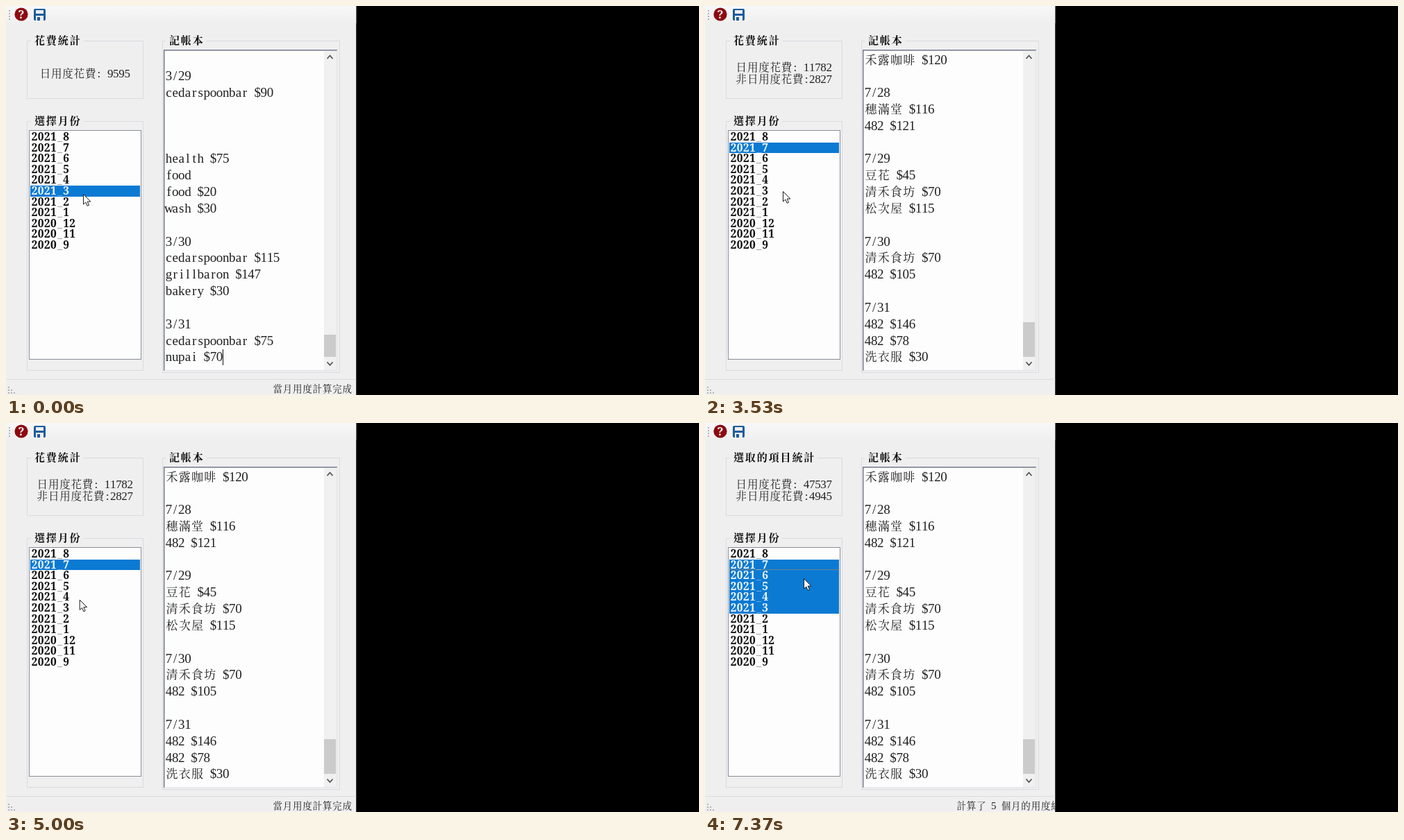
These frames come from a looping animation (998x561 px, 7410 ms). An HTML page with a canvas:

```html
<!DOCTYPE html>
<html lang="zh-Hant">
<head>
<meta charset="utf-8">
<title>記帳本</title>
<style>
html, body { margin: 0; width: 100%; height: 100%; overflow: hidden; background: #000; }
canvas { display: block; width: 998px; height: 561px; }
</style>
</head>
<body>
<canvas id="stage" width="998" height="561"></canvas>
<script>
const ctx = document.getElementById('stage').getContext('2d');
const LOOP = 7410, APP_W = 504.5;
const FACE = '#efefef', PAPER = '#fdfdfd', INK = '#202020', BLUE = '#0b7ad3', GROUP = '#dadae2';
const LATIN = '"Liberation Serif", "Noto Serif", serif';
const SLAB = '"Noto Serif", "Liberation Serif", serif';
const HAN = '"Noto Serif CJK TC", "Noto Sans CJK TC", "Noto Sans CJK", sans-serif';

const MONTHS = '2021_8 2021_7 2021_6 2021_5 2021_4 2021_3 2021_2 2021_1 2020_12 2020_11 2020_9'.split(' ');
const march = {
  row: 5,
  thumb: 474,
  sum: ['日用度花費: 9595'],
  lines: ['', '3/29', 'cedarspoonbar $90', '', '', '', 'health $75', 'food', 'food $20',
    'wash $30', '', '3/30', 'cedarspoonbar $115', 'grillbaron $147', 'bakery $30', '',
    '3/31', 'cedarspoonbar $75', 'nupai $70']
};
const july = {
  row: 1,
  thumb: 456,
  sum: ['日用度花費: 11782', '非日用度花費:2827'],
  lines: ['禾露咖啡 $120', '', '7/28', '穗滿堂 $116', '482 $121', '', '7/29', '豆花 $45',
    '清禾食坊 $70', '松次屋 $115', '', '7/30', '清禾食坊 $70', '482 $105', '', '7/31',
    '482 $146', '482 $78', '洗衣服 $30']
};
const RANGE_SUM = ['日用度花費: 47537', '非日用度花費:4945'];
const DONE = '當月用度計算完成', RANGE_DONE = '計算了 5 個月的用度總';

// The story: clicks on a month, then a drag over several months.
const CLICKS = [[-200, march], [1690, july], [3650, march], [4300, july]];
const DRAG = 5070, DROP = 5940;
const LAG = 60, BLINK = 530, STATUS_TIME = 1580;

// Pointer moves: begin, end, x, y
const HOME = [111, 271];
const MOVES = [
  [500, 630, 101, 256], [770, 1400, 105, 208], [1720, 2270, 106, 251], [2300, 2530, 112, 267],
  [4030, 4290, 104, 201], [4830, 5060, 106, 265], [5080, 5400, 97, 191], [5600, 5900, 104, 206],
  [6370, 7100, 150, 234], [7130, 7370, 142, 224]
];

const clamp = (v, lo, hi) => Math.max(lo, Math.min(hi, v));
const ease = u => u * u * (3 - 2 * u);
const lastClick = t => CLICKS.filter(([time]) => time <= t).pop() || CLICKS[0];

function pointerAt(t) {
  return MOVES.reduce(([px, py], [begin, end, x, y]) => {
    const k = ease(clamp((t - begin) / (end - begin), 0, 1));
    return [px + (x - px) * k, py + (y - py) * k];
  }, HOME);
}

const ROW_H = 15.57;
const rowY = r => Math.round(181.1 + r * ROW_H);
const rowAt = y => Math.floor((y - 181.1) / ROW_H);

function stateAt(t) {
  const [time, month] = lastClick(t);
  const [sumTime, summed] = lastClick(t - LAG);
  const dragging = t >= DRAG, ranged = t >= DROP + LAG;
  const bottom = dragging ? march.row : month.row;
  return {
    month, bottom, dragging,
    top: dragging ? clamp(rowAt(pointerAt(Math.min(t, DROP))[1]), 0, bottom) : bottom,
    caret: t < DRAG && (t - time) % (2 * BLINK) < BLINK,
    title: ranged ? '選取的項目統計' : '花費統計',
    sum: ranged ? RANGE_SUM : summed.sum,
    status: ranged ? RANGE_DONE : t < sumTime + STATUS_TIME ? DONE : ''
  };
}

function fill(color, x, y, w, h) {
  ctx.fillStyle = color;
  ctx.fillRect(x, y, w, h);
}

function frame(color, x, y, w, h) {
  ctx.strokeStyle = color;
  ctx.lineWidth = 1;
  ctx.strokeRect(x + .5, y + .5, w - 1, h - 1);
}

function line(color, width, ...pts) {
  ctx.strokeStyle = color;
  ctx.lineWidth = width;
  ctx.beginPath();
  pts.forEach(([x, y]) => ctx.lineTo(x, y));
  ctx.stroke();
}

// Fixed pitch text: Han characters take two cells. Returns the end x.
function type(str, x, y, cell, latin, han, color = INK) {
  ctx.fillStyle = color;
  ctx.textAlign = 'center';
  for (const ch of str) {
    const wide = ch > '\u2e80', w = wide ? cell * 2 : cell;
    ctx.font = wide ? han : latin;
    ctx.globalAlpha = ch === '_' ? .4 : 1;
    ctx.fillText(ch, x + w / 2, y);
    x += w;
  }
  ctx.globalAlpha = 1;
  return x;
}

function group(title, x, y, w, h, tx) {
  frame(GROUP, x, y, w, h);
  fill(FACE, tx - 4, y - 4, title.length * 16.9 + 8, 9);
  type(title, tx, y + 4.5, 8.45, '', `bold 15px ${HAN}`, '#0c0c0c');
}

function toolbar() {
  const shade = ctx.createLinearGradient(0, 0, 0, 25);
  shade.addColorStop(0, '#f8f8f8');
  shade.addColorStop(1, FACE);
  fill(shade, 0, 0, APP_W, 25);
  for (let y = 6; y < 19; y += 4) fill('#b4b4b4', 4, y, 2, 2);

  ctx.fillStyle = '#8c0a12';
  ctx.beginPath();
  ctx.arc(22, 12, 9.6, 0, 7);
  ctx.fill();
  ctx.fillStyle = '#fff';
  ctx.font = `bold 16px ${SLAB}`;
  ctx.textAlign = 'center';
  ctx.fillText('?', 22, 17.5);

  ctx.fillStyle = '#1d5c9c';
  ctx.beginPath();
  ctx.roundRect(40, 4, 17, 17, 2);
  ctx.fill();
  fill(FACE, 43, 6, 11, 5);
  fill(FACE, 43, 14, 11, 7);
  fill('#1d5c9c', 45, 16, 4, 5);
}

function monthList({ top, bottom, dragging }) {
  fill(PAPER, 33, 179, 162, 331);
  frame('#8a8f98', 33, 179, 162, 331);
  fill(BLUE, 35, rowY(top), 158, rowY(bottom + 1) - rowY(top));
  if (dragging) {
    const y = rowY(top + 1) - .5;
    ctx.setLineDash([1, 1]);
    line('#d98a3c', 1, [35, y], [193, y]);
    ctx.setLineDash([]);
  }
  MONTHS.forEach((m, r) => {
    const on = r >= top && r <= bottom;
    type(m, 36.5, 194.2 + r * ROW_H, 9.1, `bold 15.5px ${SLAB}`, '', on ? '#f4f8fc' : '#0e0e0e');
  });
}

function notebook({ month, caret }) {
  fill(PAPER, 227, 63, 250, 463);
  line('#73778a', 1.5, [227.7, 526], [227.7, 63.7], [477, 63.7]);
  line('#e2e2e4', 1, [228, 525.5], [476.5, 525.5], [476.5, 64]);
  let end = 230;
  month.lines.forEach((s, i) => {
    end = type(s, 230, 83.5 + i * 23.83, 9.12, `19px ${LATIN}`, `17px ${HAN}`);
  });
  if (caret) fill('#111', Math.round(end), 495, 1, 23);

  fill('#f0f0f0', 458, 65, 18, 460);
  fill('#cbcbcb', 458, month.thumb, 17, 506 - month.thumb);
  for (const [y, tip] of [[76, 71.5], [513.5, 518]])
    line('#505050', 1.7, [462.5, y], [466.5, tip], [470.5, y]);
}

function statusBar(text) {
  fill('#dcdcdc', 0, 538, APP_W, 1);
  for (let r = 0; r < 3; r++)
    for (let c = 0; c <= r; c++) fill('#b2b2b2', 3 + c * 4, 549 + r * 4, 2, 2);
  type(text, text === DONE ? 384 : 362, 557, 7.15, `15px ${LATIN}`, `13.5px ${HAN}`);
}

const arrow = new Path2D('M.5 .5V15L3.8 12 6.2 17.3 8.5 16.3 6.2 11.1H10.8Z');
function pointer([x, y]) {
  ctx.save();
  ctx.translate(x, y);
  ctx.fillStyle = '#fff';
  ctx.fill(arrow);
  ctx.strokeStyle = '#1a1a1a';
  ctx.lineWidth = 1;
  ctx.stroke(arrow);
  ctx.restore();
}

function draw(t) {
  const state = stateAt(t);
  fill('#000', 0, 0, 998, 561);
  ctx.save();
  ctx.beginPath();
  ctx.rect(0, 0, APP_W, 561);
  ctx.clip();
  fill(FACE, 0, 0, APP_W, 561);
  toolbar();

  group(state.title, 30, 50, 168, 84, 40);
  group('選擇月份', 30, 166, 168, 360, 40);
  group('記帳本', 225, 50, 256, 479, 234);

  // The totals are centred in their box.
  const cell = 8.15, n = state.sum.length;
  state.sum.forEach((s, i) => {
    const units = [...s].reduce((sum, ch) => sum + (ch > '\u2e80' ? 2 : 1), 0);
    const y = 102.5 + (i - (n - 1) / 2) * 16.7;
    type(s, 113.5 - units * cell / 2, y, cell, `17px ${LATIN}`, `15.5px ${HAN}`);
  });

  monthList(state);
  notebook(state);
  statusBar(state.status);
  pointer(pointerAt(t));
  ctx.restore();
}

const start = performance.now();
function tick(now) {
  draw(Math.max(0, now - start) % LOOP);
  requestAnimationFrame(tick);
}
draw(0);
requestAnimationFrame(tick);
</script>
</body>
</html>
```
